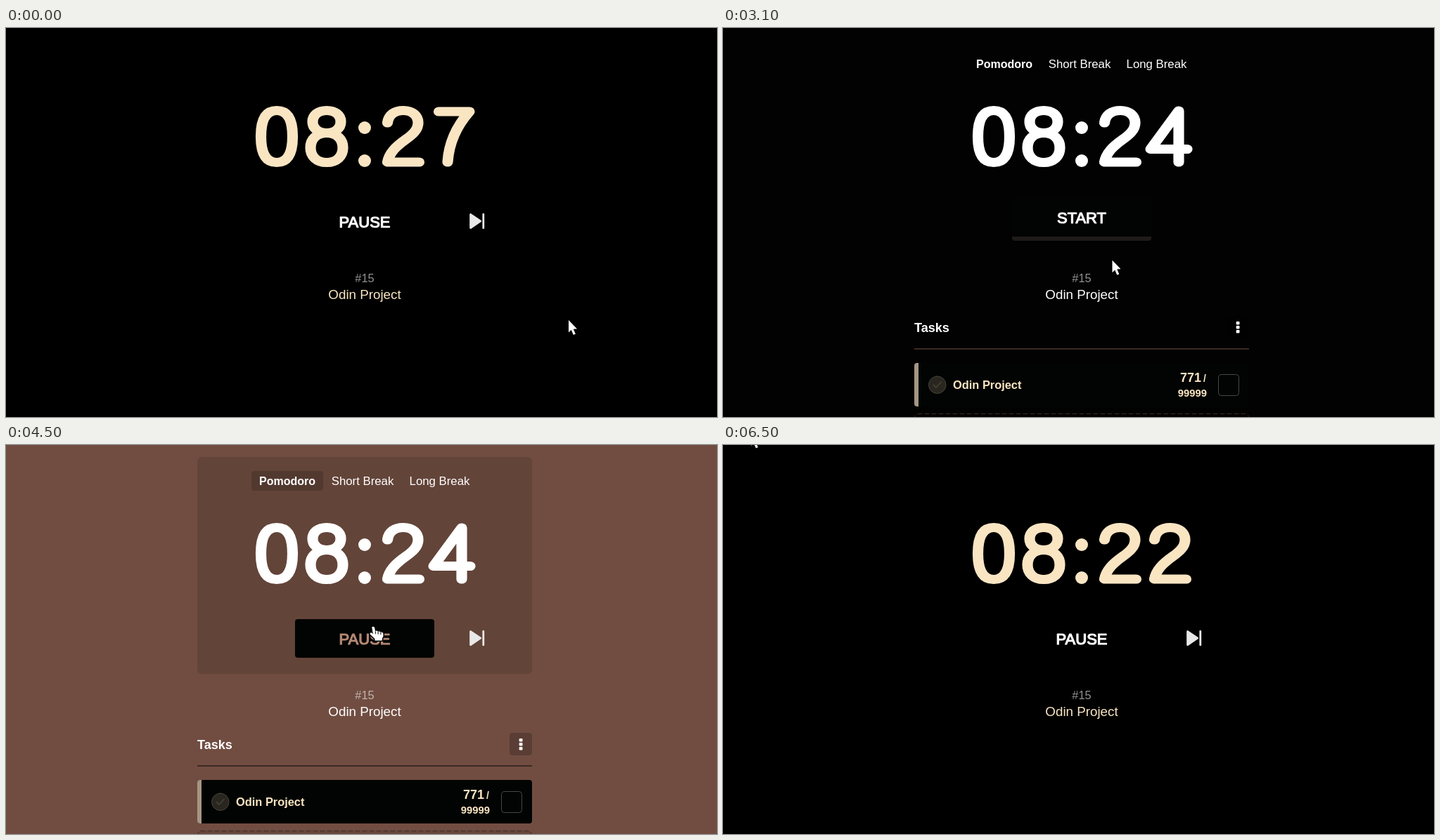
An HTML page with a canvas for the animation above (7300 ms loop, 1011 by 554 pixels).

```html
<!DOCTYPE html>
<html lang="en">
<head>
<meta charset="utf-8">
<title>Pomodoro timer</title>
<style>
  html, body { margin: 0; width: 100%; height: 100%; overflow: hidden; background: #000; }
  canvas { display: block; }
</style>
</head>
<body>
<canvas id="stage" width="1011" height="554"></canvas>
<script>
const ctx = document.getElementById('stage').getContext('2d');
const LOOP = 7300;
const CREAM = '#fae5c3';
const BLACK = [0, 0, 0], BROWN = [113, 77, 65];
const WHITE = [255, 255, 255], CLAY = [180, 136, 117];

// Centre lines of the rounded digits, x around 0, y from 0 to 89.
const DIGITS = {
  0: 'M-22.5 44.5C-22.5 18-14 7.5 0 7.5S22.5 18 22.5 44.5 14 81.5 0 81.5-22.5 71-22.5 44.5Z',
  2: 'M-22.5 25C-21 13-12 7.5 0 7.5C13 7.5 21 15 21 25C21 35 13 42 3 49C-11 59-20 68-22.5 81H22.5',
  3: 'M-21 24C-18 13-11 7.5 0 7.5C12 7.5 20 14 20 24C20 34 12 40.5 1 40.5H-5M1 40.5C14 40.5 22 48 22 60C22 73 13 81.5 0 81.5C-12 81.5-20 75-23 66',
  4: 'M12 81V8L-28 62.5H24',
  5: 'M20 9H-14L-20 43C-14 36-8 33.5 0 33.5C14 33.5 22.5 43 22.5 57C22.5 72 13 81.5-1 81.5C-13 81.5-20 76-23 67',
  6: 'M20 23C17 12 10 7.5 1 7.5C-15 7.5-22.5 22-22.5 46C-22.5 70-14 81.5 1 81.5C14 81.5 22.5 72 22.5 58.5C22.5 45 14 36.5 1 36.5C-10 36.5-19 43-22 53',
  7: 'M-20.5 9H23C8 26-6 50-8 81',
  8: 'M0 7.5C12 7.5 20 14 20 23.5S12 39.5 0 39.5-20 33-20 23.5-12 7.5 0 7.5ZM0 39.5C14 39.5 23 48 23 60.5S14 81.5 0 81.5-23 73-23 60.5-14 39.5 0 39.5Z'
};
const PEN_WIDTH = 15.2, PEN_RATIO = 0.87; // the pen is wider than tall
const ARROW = new Path2D('M0 0V17.5L3.8 14 6.8 21 9.8 19.8 6.8 12.8 12 12.4Z');
const HAND = new Path2D('M-2 1.2C-2-.6 1.4-.6 1.8 1.2L2.8 6.4C4 5.4 6 5.6 6.6 7C8 6.2 9.8 6.6 10.4 8C12 7.4 14 8.2 14.2 10V13.6L12.6 16.6V19.6H2.2V17.2L-4.4 11C-5.4 9.2-3.6 7.8-2 9L-.4 10.2Z');
const KNUCKLES = new Path2D('M3 7V10M6.8 7.4V10.4M10.6 8.4V10.8');

// Pointer stops: time, x, y
const POINTER = [
  [200, 800, 416], [1000, 520, 264], [1200, 489, 269], [1400, 489, 270], [1900, 280, 147],
  [2000, 280, 147], [2200, 244, 158], [2300, 244, 158], [2800, 520, 274], [2900, 520, 274],
  [3300, 587, 387.5], [3500, 635.5, 415], [3700, 597, 333], [3800, 522.3, 258.8],
  [5600, 522.3, 258.8], [6100, 490, 172], [6500, 40, -16.5]
];
const TICKS = [600, 1600, 2600, 5400, 6400];

const progress = (t, start, span) => {
  const k = Math.min(1, Math.max(0, (t - start) / span));
  return (1 - Math.cos(Math.PI * k)) / 2;
};
const mix = (a, b, k) => `rgb(${a.map((v, i) => Math.round(v + (b[i] - v) * k))})`;

function box(x, y, w, h, r, fill, stroke) {
  ctx.beginPath();
  ctx.roundRect(x, y, w, h, r);
  if (fill) { ctx.fillStyle = fill; ctx.fill(); }
  if (stroke) { ctx.strokeStyle = stroke; ctx.lineWidth = 1; ctx.stroke(); }
}

function text(str, x, y, size, color, { bold, align = 'center', round = 0 } = {}) {
  ctx.font = `${bold ? 'bold ' : ''}${size}px "Liberation Sans", Arial, sans-serif`;
  ctx.textAlign = align;
  ctx.fillStyle = ctx.strokeStyle = color;
  ctx.fillText(str, x, y);
  if (round) { ctx.lineWidth = round; ctx.strokeText(str, x, y); }
}

function drawDigit(digit, x) {
  const path = new Path2D();
  path.addPath(new Path2D(DIGITS[digit]), new DOMMatrix().scale(1, 1 / PEN_RATIO));
  ctx.save();
  ctx.translate(x, 110);
  ctx.scale(1, PEN_RATIO);
  ctx.stroke(path);
  ctx.restore();
}

function clock(seconds, color) {
  const [tens, ones] = String(seconds);
  ctx.strokeStyle = ctx.fillStyle = color;
  ctx.lineWidth = PEN_WIDTH;
  drawDigit(0, 385);
  drawDigit(8, 456);
  drawDigit(tens, 565);
  drawDigit(ones, 636);
  for (const y of [142, 189]) {
    ctx.beginPath();
    ctx.arc(510, y, 9, 0, 7);
    ctx.fill();
  }
}

function skipIcon(alpha) {
  ctx.globalAlpha = alpha;
  ctx.fillStyle = ctx.strokeStyle = '#e9e8e8';
  ctx.lineWidth = 3;
  const triangle = new Path2D('M660.7 265.7V284.5L674.5 275Z');
  ctx.fill(triangle);
  ctx.stroke(triangle);
  box(677.4, 264, 2.8, 22, 1, '#e9e8e8');
  ctx.globalAlpha = 1;
}

function panels() {
  box(272, 17, 476, 309, 6, 'rgba(0,0,0,.12)');
  box(349, 37, 102, 28, 4, 'rgba(0,0,0,.17)');
  text('Pomodoro', 400, 56.5, 16, '#fff', { bold: true });
  text('Short Break', 507, 56.5, 16.8, '#fff');
  text('Long Break', 616.5, 56.5, 16.8, '#fff');

  text('Tasks', 272, 432.5, 18, '#fff', { bold: true, align: 'left' });
  box(716, 410, 32, 32, 4, 'rgba(0,0,0,.2)');
  for (const y of [418, 424, 430]) box(729.7, y, 4.8, 4.4, 1, '#fff');
  box(272, 456, 476, 2, 0, '#3c2a25');

  box(272, 477, 476, 62, 4, '#020403');
  box(272, 477, 6, 62, [4, 0, 0, 4], '#a59683');
  box(292.5, 496, 24.5, 24.5, 12.2, '#28261f', '#48443a');
  ctx.strokeStyle = '#403c32';
  ctx.lineWidth = 2;
  ctx.stroke(new Path2D('M299.5 508.5L303 512 310 504.5'));
  text('Odin Project', 327, 514, 16.4, CREAM, { bold: true, align: 'left' });
  text('771', 680, 504, 18, CREAM, { bold: true, align: 'right' });
  text('/', 687, 504, 14, CREAM, { bold: true, align: 'right' });
  text('99999', 688, 525, 14.8, CREAM, { bold: true, align: 'right' });
  box(704.5, 493.5, 29, 30, 4, null, '#484646');

  ctx.setLineDash([6, 4]);
  box(273, 549.5, 474, 60, 4, 'rgba(0,0,0,.1)', '#3c2a25');
  ctx.setLineDash([]);
}

function pointer(t) {
  let next = POINTER.findIndex(p => p[0] > t);
  if (next < 0) next = POINTER.length;
  const b = POINTER[Math.min(next, POINTER.length - 1)];
  const a = POINTER[Math.max(next - 1, 0)];
  const k = b === a ? 0 : (t - a[0]) / (b[0] - a[0]);
  const x = a[1] + (b[1] - a[1]) * k, y = a[2] + (b[2] - a[2]) * k;
  const overButton = x > 411 && x < 609 && y > 242 && y < 303;
  const shape = overButton ? HAND : ARROW;
  ctx.save();
  ctx.translate(x, y);
  ctx.strokeStyle = '#000';
  ctx.lineWidth = 3;
  ctx.stroke(shape);
  ctx.fillStyle = '#fff';
  ctx.fill(shape);
  if (overButton) {
    ctx.lineWidth = 1;
    ctx.stroke(KNUCKLES);
  }
  ctx.restore();
}

function draw(t) {
  const focus = t < 3000 || t >= 5400;
  const running = focus || t >= 4200;
  const warmth = progress(t, 3050, 500) - progress(t, 5310, 500);
  const seconds = 27 - TICKS.filter(tick => t >= tick).length;

  ctx.lineCap = ctx.lineJoin = 'round';
  ctx.fillStyle = mix(BLACK, BROWN, warmth);
  ctx.fillRect(0, 0, 1011, 554);

  if (!focus) {
    panels();
    if (running) {
      box(411, 248, 198, 55, 4, '#020403');
    } else {
      box(411, 250, 198, 53, 4, '#1f1b19');
      box(411, 242, 198, 55, [4, 4, 0, 0], '#020403');
    }
  }
  clock(seconds, focus ? CREAM : '#fff');
  text(running ? 'PAUSE' : 'START', 510, running ? 284 : 278, 22, mix(WHITE, CLAY, warmth), { round: 1.2 });
  if (running) skipIcon(focus ? 1 : progress(t, 4120, 380));
  text('#15', 510, 361.5, 16.4, 'rgba(255,255,255,.57)');
  text('Odin Project', 510, 386, 18.8, focus ? CREAM : '#fff');
  pointer(t);
}

function frame(now) {
  draw(Math.floor(now % LOOP / 100) * 100);
  requestAnimationFrame(frame);
}
requestAnimationFrame(frame);
</script>
</body>
</html>
```
